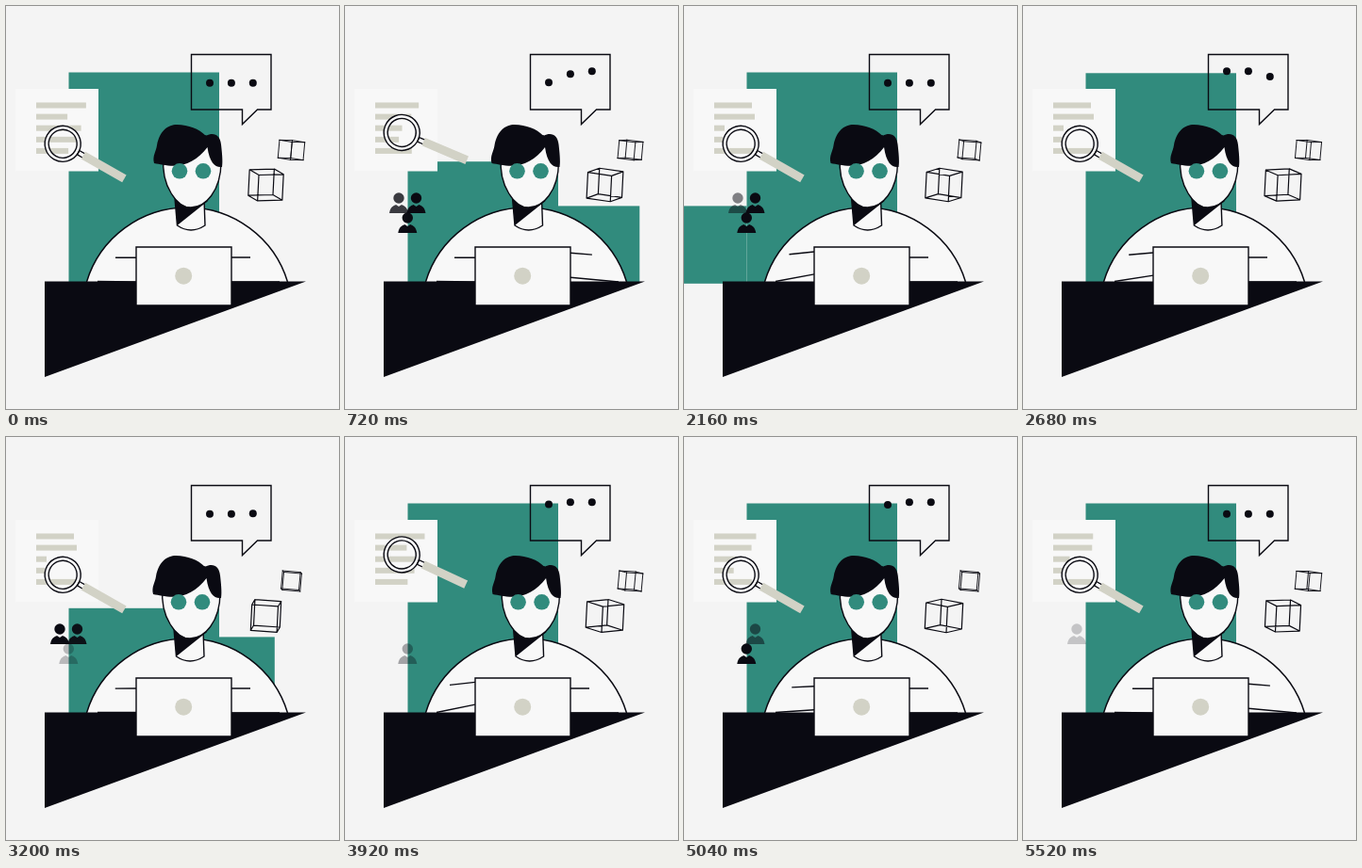
Write an HTML page with a canvas that moves like this. It is 353x428 px and loops after 5.56 s.

```html
<!DOCTYPE html>
<html lang="en">
<head>
<meta charset="utf-8">
<title>Working at a laptop</title>
<style>
html, body { margin: 0; width: 100%; height: 100%; overflow: hidden; background: #f4f4f4; }
canvas { display: block; }
</style>
</head>
<body>
<canvas id="stage" width="353" height="428"></canvas>
<script>
const LOOP = 5560;
const INK = '#0a0a12', PAPER = '#f8f8f8', GREEN = '#318b7d', BEIGE = '#d2d2c6';
const ctx = document.getElementById('stage').getContext('2d');

const linear = (t, a, b) => Math.min(1, Math.max(0, (t - a) / (b - a)));
const ease = (t, a, b) => 0.5 - 0.5 * Math.cos(Math.PI * linear(t, a, b));
const pulse = (t, a, b, c, d) => ease(t, a, b) - ease(t, c, d);
const mix = (a, b, k) => a + (b - a) * k;

function box(x, y, w, h, fill) {
  ctx.fillStyle = fill;
  ctx.fillRect(x, y, w, h);
}

function shape(d, fill, stroke, width = 1.4) {
  const path = new Path2D(d);
  if (fill) { ctx.fillStyle = fill; ctx.fill(path); }
  if (stroke) { ctx.strokeStyle = stroke; ctx.lineWidth = width; ctx.stroke(path); }
}

function disc(x, y, r, fill) {
  ctx.beginPath();
  ctx.arc(x, y, r, 0, 7);
  ctx.fillStyle = fill;
  ctx.fill();
}

function at(x, y, angle, draw) {
  ctx.save();
  ctx.translate(x, y);
  ctx.rotate(angle);
  draw();
  ctx.restore();
}

function backdrop(t) {
  // two rounds, then the panel rests
  const u = t < 4720 ? t % 2360 : 0;
  const drop = 112 * pulse(u, 290, 870, 870, 1450);
  const right = 86.3 * pulse(u, 396, 718, 718, 1040);
  const left = 86.3 * pulse(u, 1748, 2070, 2070, 2392);
  box(66.5, 70.5 + drop, 159.5, 222.5 - drop, GREEN);
  box(226, 212.4, right, 80.6, GREEN);
  box(66.5 - left, 212.4, left, 82.4, GREEN);
}

function page(t) {
  const k = linear(t % 4000, 0, 2100) ** 0.6 * (1 - ease(t % 4000, 3400, 4000));
  box(10, 88, 88, 87.5, PAPER);
  [[85, 72], [65, 75], [80, 43], [75, 41], [66, 75]].forEach(([from, to], i) =>
    box(32, 102.5 + 12.1 * i, mix(from, to, k) - 32, 6, BEIGE));
}

function magnifier(t) {
  const u = t % 3040;
  const rise = 25 * pulse(u, 430, 1030, 1230, 1830);
  const swing = 0.115 * Math.sin(Math.PI * linear(u, 430, 1030));
  at(60.2, 146.3 - rise, 0.517 - swing, () => {
    ctx.lineWidth = 4;
    ctx.strokeStyle = PAPER;
    ctx.beginPath();
    ctx.arc(0, 0, 17, 0, 7);
    ctx.stroke();
    shape('M19 -2.5H27V2.5H19Z', PAPER, INK, 1.3);
    shape('M19 0A19 19 0 1 1 -19 0A19 19 0 1 1 19 0M15 0A15 15 0 1 1 -15 0A15 15 0 1 1 15 0', null, INK, 1.4);
    box(25, -4.5, 50, 9, BEIGE);
  });
}

function people(t) {
  const u = t % 1350;
  [[57, 209, 60, 660], [75.5, 209, 215, 845], [66.3, 230, 425, 1025]].forEach(([x, y, on, off]) => {
    ctx.globalAlpha = linear(u, on, on + 300) * (1 - linear(u, off, off + 300));
    at(x, y, 0, () => {
      disc(0, -5, 5.7, INK);
      shape('M-10 11C-9 4 -5 3 -3 2L0 4L3 2C5 3 9 4 10 11Z', INK);
    });
  });
  ctx.globalAlpha = 1;
}

function man(t) {
  const u = t % 600;
  const l = Math.sin(Math.PI * linear(u, 180, 480)) ** 2;
  const r = Math.sin(Math.PI * linear(u, 20, 200)) ** 2;
  const sway = -0.75 * (1 - Math.cos(2 * Math.PI * t / 1390));

  shape('M85.5 293A111.3 111.3 0 0 1 298.5 293', PAPER, INK, 1.5);
  shape(`M${116 - 5 * l} ${267.3 - 4 * l}L138 ${267.3 - 7 * l}M97 292.5L138 ${293 - 9 * l}
    M239 ${267 - 5 * r}L${259 + 3 * r} ${267 - 3 * r}M239 ${293 - 5 * r}L290 293`, null, INK);

  at(sway, 0, 0, () => {
    shape('M179 204L181.5 233Q196 243 211 233L210 205Z', PAPER, INK);
    shape('M179 204L181.5 233L214 207Z', INK);
    shape('M167 160C164 192 182 214 196 214C211 214 228 197 228 165L212 138L180 138Z', PAPER, INK);
    shape(`M157 167C155 159 159 155 160 148C163 132 172 126 181 126C194 126.5 204 130 212 138
      C220 133.5 227 137 228 147C229 156 230 165 229 171C222 172 216 167 213.5 150
      C204 163 190 170 178 169.8C169 169.5 163 168 157 167Z`, INK);
    disc(184, 175.3, 8.3, GREEN);
    disc(209, 175.3, 8.3, GREEN);
  });
}

function desk() {
  shape('M41 292.5H318L41 394Z', INK);
  shape('M138 256H239V318H138Z', PAPER, INK);
  disc(188.2, 286.7, 9, BEIGE);
}

function bubble(t) {
  shape('M196.5 51.5H281V110H266.5L250.5 125.5V110H196.5Z', null, INK);
  const u = t % 1112 / 1112;
  for (let i = 0; i < 3; i++) {
    const hop = pulse(u - 0.115 * i, 0.06, 0.29, 0.47, 0.67);
    disc(216 + 22.9 * i, 81.7 - 12.4 * hop, 4, INK);
  }
}

function cube(x, y, size, yaw, pitch, roll, width) {
  const project = i => {
    const [a, b, c] = [1, 2, 4].map(bit => (i & bit ? 0.5 : -0.5) * size);
    const depth = a * Math.sin(yaw) + c * Math.cos(yaw);
    return [a * Math.cos(yaw) - c * Math.sin(yaw), b * Math.cos(pitch) + depth * Math.sin(pitch)];
  };
  at(x, y, roll, () => {
    ctx.beginPath();
    for (let i = 0; i < 8; i++)
      for (const bit of [1, 2, 4])
        if (!(i & bit)) {
          ctx.moveTo(...project(i));
          ctx.lineTo(...project(i | bit));
        }
    ctx.strokeStyle = INK;
    ctx.lineWidth = width;
    ctx.lineJoin = ctx.lineCap = 'round';
    ctx.stroke();
  });
}

function draw(now) {
  const t = now % LOOP;
  const turn = Math.PI / 2 * t / LOOP;
  box(0, 0, 353, 428, '#f4f4f4');
  backdrop(t);
  page(t);
  people(t);
  magnifier(t);
  man(t);
  desk();
  bubble(t);
  cube(275.5, 190, 28, 1.2 + 4 * turn, 0.2, 0.05, 1.2);
  cube(302.5, 153, 19, Math.PI / 4 + 6 * turn, 0.07, 0.09, 0.9);
}

const start = performance.now();
function tick() {
  draw(performance.now() - start);
  requestAnimationFrame(tick);
}
tick();
</script>
</body>
</html>
```
